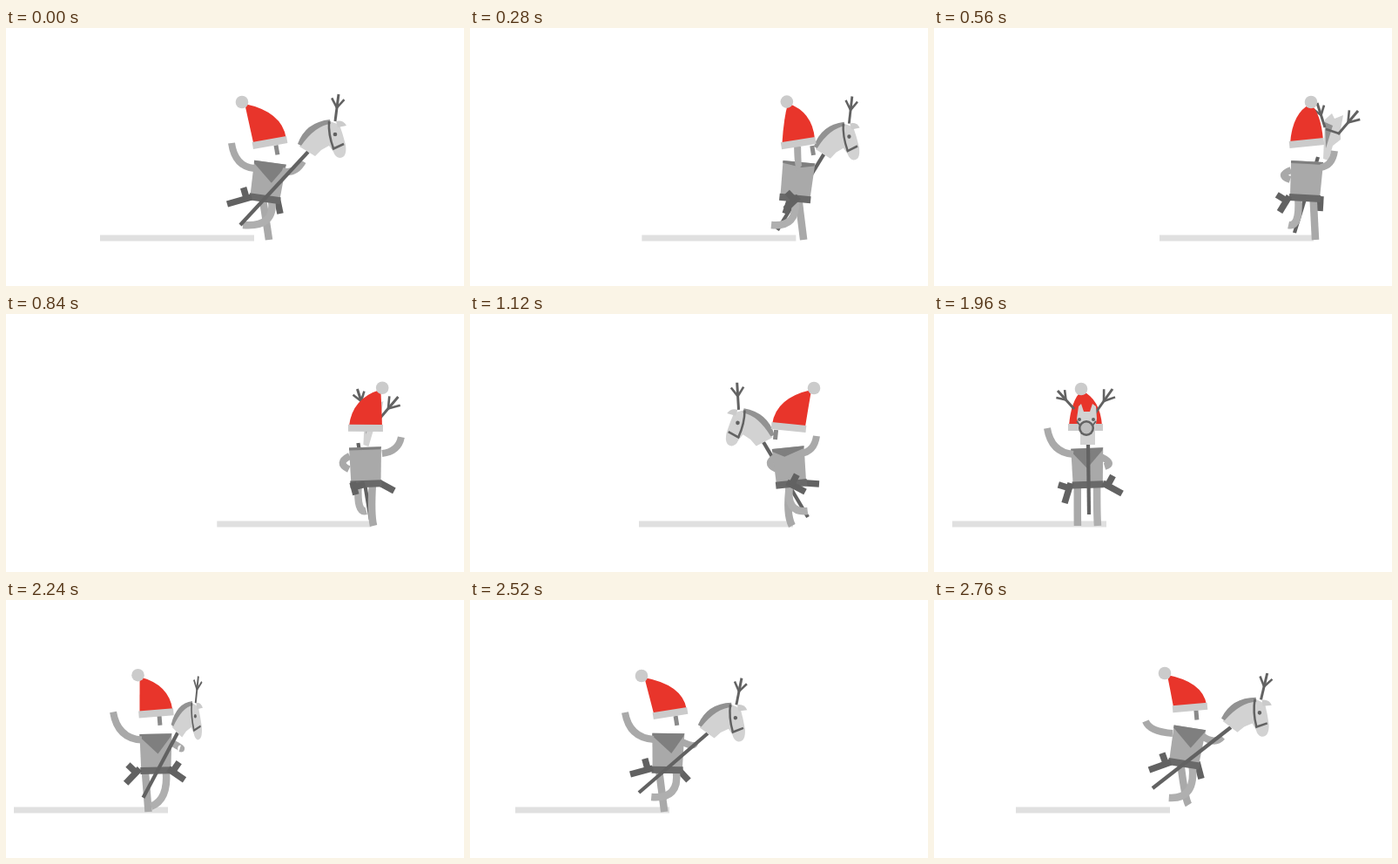
These frames come from a looping animation (526x296 px, 2800 ms). An HTML page with a canvas:

```html
<!DOCTYPE html>
<html lang="en">
<head>
<meta charset="utf-8">
<title>Hobby reindeer ride</title>
<style>
html, body { margin: 0; width: 100%; height: 100%; overflow: hidden; background: #fff; }
canvas { display: block; width: 526px; height: 296px; }
</style>
</head>
<body>
<canvas id="stage" width="526" height="296"></canvas>
<script>
const LOOP = 2800, HOP = 280, TICK = 40;
const KEYS = [0, 560, 1120, 1480, 1960, 2520, 2760];
const RED = '#e8352b', PALE = '#cbcbcb', LIGHT = '#d2d2d2', SKIN = '#a9a9a9',
      SCARF = '#7f7f7f', MANE = '#929292', DARK = '#626262';
const c = document.getElementById('stage').getContext('2d');
const clamp = (v, lo, hi) => Math.min(hi, Math.max(lo, v));

// Smooth periodic curve through (keys, vals).
function spline(keys, vals, period) {
  const n = keys.length;
  const k = i => keys[(i + n) % n] + Math.floor(i / n) * period;
  const v = i => vals[(i + n) % n];
  const slope = i => (v(i + 1) - v(i - 1)) / (k(i + 1) - k(i - 1));
  return t => {
    t = ((t % period) + period) % period;
    let i = n - 1;
    while (i > 0 && keys[i] > t) i--;
    const d = k(i + 1) - k(i), s = (t - k(i)) / d, r = 1 - s;
    return v(i) * (1 + 2 * s) * r * r + v(i + 1) * s * s * (3 - 2 * s)
      + d * s * r * (slope(i) * r - slope(i + 1) * s);
  };
}

const ground = spline([0, 560, 1120, 1480, 1680, 1960, 2120, 2240, 2520, 2760],
                      [108, 259, 194, 122, 58, 21, 2, 9, 52, 94], LOOP);
const plain = (...v) => spline(KEYS, v, LOOP);
// A track that rides on a base motion and still passes through its keys.
function ride(base, v) {
  const rest = spline(KEYS, v.map((y, i) => y - base(KEYS[i])), LOOP);
  return t => base(t) + rest(t);
}
const across = (...v) => ride(ground, v);
const bob = (amp, lag, ...v) =>
  ride(t => amp * Math.sin(2 * Math.PI * (t / HOP - lag)), v);

const turn = plain(0, -2, 11, -5, 16, 6, -3);
const body = {
  x: across(300, 427, 367, 275, 176, 227, 290),
  y: bob(9, 0, 176, 175, 175, 184, 176, 175, 168),
  tilt: plain(8, 3, -6, -2, -2, 1, 9)
};
const hat = {
  x: across(303, 428, 366, 270, 174, 230, 294),
  y: bob(9, .03, 131.5, 132, 130, 143, 130, 130, 123.5),
  tilt: plain(-10, -6, 6, 0, 0, -9, -5),
  pomX: across(271, 433, 395, 296, 169, 197, 265),
  pomY: bob(11, .1, 85, 85, 85, 105, 86, 87, 84)
};
const wave = {
  x: across(259, 460, 398, 247, 130, 178, 243),
  y: bob(5, .1, 132, 141, 140, 146, 131, 129, 139),
  root: plain(-15, 17, 13, -14, -16, -16, -16)
};
const grip = {
  x: across(341, 409, 352, 243, 196, 258, 331),
  y: bob(3, 0, 153, 174, 178, 169, 175, 163, 157),
  root: plain(17, -17, -14, -10, 16, 17, 18)
};
const stick = {
  x: across(269, 414, 388, 278, 178, 194, 251),
  y: bob(4, 0, 226, 235, 233, 221, 230, 221, 216),
  topX: across(347, 441, 337, 230, 177, 273, 341),
  topY: bob(2, .1, 142, 148, 147, 149, 150, 153, 146),
  nod: plain(0, 0, -4, -1, 0, 4, 6)
};
const guns = [{
  x: across(254, 443, 401, 250, 150, 184, 247),
  y: bob(6, .1, 202, 210, 195, 208, 217, 200, 195),
  root: plain(-18, 17, 5, -13, -19, -17, -18),
  near: (co, si) => co > si
}, {
  x: across(315, 397, 385, 312, 216, 251, 307),
  y: bob(6, .1, 213, 211, 204, 217, 206, 207, 205),
  root: plain(11, -19, -3, 18, 18, 11, 12),
  near: co => co < .6
}];

const gait = (...v) => spline([0, 80, 160, 240], v, HOP);
const legs = [
  { side: 1, reach: gait(2, -7, -12, 4), foot: gait(243, 243, 239, 235), tone: SKIN },
  { side: -1, reach: gait(-28, -20, -24, -22), foot: gait(226, 242, 233, 227), tone: '#afafaf' }
];

function fill(color, path) {
  c.fillStyle = color;
  c.fill(path);
}
function shape(color, ...pts) {
  c.beginPath();
  pts.forEach(([x, y]) => c.lineTo(x, y));
  c.fillStyle = color;
  c.fill();
}
function dot(color, x, y, r) {
  c.beginPath();
  c.arc(x, y, r, 0, 7);
  c.fillStyle = color;
  c.fill();
}
function line(color, w, x0, y0, x1, y1) {
  bend(color, w, x0, y0, (x0 + x1) / 2, (y0 + y1) / 2, x1, y1);
}
function bend(color, w, x0, y0, cx, cy, x1, y1) {
  c.beginPath();
  c.moveTo(x0, y0);
  c.quadraticCurveTo(cx, cy, x1, y1);
  c.lineWidth = w;
  c.strokeStyle = color;
  c.stroke();
}
function at(x, y, deg, draw) {
  c.save();
  c.translate(x, y);
  c.rotate(deg * Math.PI / 180);
  draw();
  c.restore();
}

function antler(x0, y0, x1, y1) {
  const dx = x1 - x0, dy = y1 - y0;
  const x = x0 + dx * .5, y = y0 + dy * .5;
  line(DARK, 3, x0, y0, x1, y1);
  for (const s of [-1, 1])
    line(DARK, 2.6, x, y, x + dx * .33 - s * dy * .23, y + dy * .33 + s * dx * .23);
}

const neck = new Path2D('M-10-6Q2-30 25-35L36-31Q40-20 43-8Q45 7 36 7Q31 6 29 0L24-7L15-2L8 5Z');
const mane = new Path2D('M-12-9Q-3-34 25-37L26-32Q8-30-8-7Z');
const ear = new Path2D('M32-35Q40-37 44-30L34-28Z');

function sideHead() {
  antler(31, -35, 35, -66);
  fill(LIGHT, neck);
  fill(PALE, ear);
  fill(MANE, mane);
  bend(DARK, 2.5, 24, -35, 23, -20, 29, -4);
  line(DARK, 2.5, 28, -3, 41, -9);
  dot(DARK, 31, -20, 2.3);
}
function frontHead() {
  antler(-16, -41, -35, -62);
  antler(8, -36, 28, -64);
  shape(LIGHT, [-11, -44], [-8, -47], [-5, -38], [2, -38], [5, -47], [9, -44],
    [10, -30], [8, -18], [8, 0], [-9, 0], [-9, -18], [-13, -30]);
  dot(DARK, -10, -29, 2);
  dot(DARK, 6, -29, 2);
  line(DARK, 2, -13, -27, -9, -22);
  line(DARK, 2, 9, -27, 5, -22);
  dot(DARK, -2, -19, 9);
  dot('#bdbdbd', -2, -19, 6.5);
}
function backHead() {
  shape(LIGHT, [8, -43], [16, -50], [19, -44], [29, -48], [26, -32],
    [26, -20], [17, -13], [12, 4], [6, 2]);
  shape(MANE, [8, -40], [17, -36], [9, -10]);
  antler(8, -34, -1, -62);
  antler(23, -26, 46, -53);
  line(DARK, 2.5, 9, -32, 24, -27);
}

function drawHorse(t, co, si) {
  const x = stick.topX(t), y = stick.topY(t);
  line(DARK, 4.2, stick.x(t), stick.y(t), x, y);
  at(x, y, 0, () => {
    if (Math.abs(co) < .45) return si > 0 ? backHead() : frontHead();
    c.scale(Math.sign(co) * Math.min(1, Math.abs(co) + .12), 1);
    c.rotate(stick.nod(t) * Math.PI / 180);
    sideHead();
  });
}

function drawLegs(t, x, y, co, si) {
  for (const leg of legs) {
    const spread = leg.side * 11 * si;
    const hip = x + spread - leg.side * 5 * Math.abs(co);
    const lift = (243 - leg.foot(t)) * (leg.side > 0 ? 1 : clamp((1 + si) * 2.5, 0, 1));
    bend(leg.tone, 8.5, hip, y + 21, hip + 5 * co, 229, x + spread + leg.reach(t) * co, 243 - lift);
  }
}

function drawGun(gun, t, x, y, co, si) {
  const x0 = x + gun.root(t), y0 = y + 18, x1 = gun.x(t), y1 = gun.y(t);
  line(DARK, 7.5, x0, y0, x1, y1);
  if (!gun.near(co, si)) return;
  const len = Math.hypot(x1 - x0, y1 - y0) || 1;
  const dx = (x1 - x0) / len, dy = (y1 - y0) / len, s = dx < 0 ? -1 : 1;
  const gx = x0 + dx * 6, gy = y0 + dy * 6;
  line(DARK, 7.5, gx, gy, gx + s * dy * 13, gy - s * dx * 13);
}

function drawTorso(x, y, tilt, co, si) {
  at(x, y, tilt, () => {
    shape(SKIN, [-18, -22], [19, -22], [17, 22], [-17, 22]);
    const drop = 20 * clamp(1 - 1.5 * si, 0, 1);
    shape(SCARF, [-18, -22], [19, -22], [18, -19], [5 * co, -19 + drop], [-18, -19]);
    line('#696969', 8, -18, 20, 18, 20);
  });
}

function drawGrip(t, x, y) {
  const root = grip.root(t), x0 = x + root, y0 = y - 12;
  const x1 = grip.x(t), y1 = grip.y(t), dx = Math.abs(x1 - x0);
  bend(SKIN, 8, x0, y0,
    (x0 + x1) / 2 + Math.sign(root) * Math.max(3, 16 - dx * .6),
    (y0 + y1) / 2 + 10 * Math.min(1, dx / 20), x1, y1);
}

function drawHat(t, co, si) {
  const x = hat.x(t), y = hat.y(t), tilt = hat.tilt(t), a = tilt * Math.PI / 180;
  const px = hat.pomX(t), py = hat.pomY(t), lean = clamp((px - x) / 30, -1, 1);
  if (Math.abs(co) > .45)
    at(x + 7 * co * (1 + 3 * Math.max(0, si)), y + 3, tilt, () => {
      c.fillStyle = '#8a8a8a';
      c.fillRect(-2.5, 0, 5, 11);
    });
  const tipX = px + (x - px) * .1, tipY = py + 2;
  const side = s => {
    const m = s * lean > 0 ? Math.abs(lean) : 0;
    const ex = x + s * 19 * Math.cos(a), ey = y + s * 19 * Math.sin(a) - 2;
    return [ex, ey, ex + (tipX - ex) * (.1 + .4 * m), ey + (tipY - ey) * (.77 - .27 * m)];
  };
  const l = side(-1), r = side(1);
  c.beginPath();
  c.moveTo(l[0], l[1]);
  c.quadraticCurveTo(l[2], l[3], tipX, tipY);
  c.quadraticCurveTo(r[2], r[3], r[0], r[1]);
  c.fillStyle = RED;
  c.fill();
  at(x, y, tilt, () => {
    c.fillStyle = PALE;
    c.fillRect(-20, -4, 40, 8);
  });
  dot(PALE, px, py, 7.3);
}

function draw(t) {
  const a = (t * 360 / LOOP + turn(t)) * Math.PI / 180;
  const co = Math.cos(a), si = Math.sin(a), away = si > .2;
  const x = body.x(t), y = body.y(t);
  c.fillStyle = '#fff';
  c.fillRect(0, 0, 526, 296);
  c.fillStyle = '#e0e0e0';
  c.fillRect(ground(t), 237.5, 177, 7);

  if (away) drawHorse(t, co, si);
  for (const g of guns) if (!g.near(co, si)) drawGun(g, t, x, y, co, si);
  drawLegs(t, x, y, co, si);
  if (away) drawGrip(t, x, y);
  drawTorso(x, y, body.tilt(t), co, si);
  const sx = x + wave.root(t), hx = wave.x(t);
  bend(SKIN, 8, sx, y - 15, hx * .85 + sx * .15, y - 17, hx, wave.y(t));
  for (const g of guns) if (g.near(co, si)) drawGun(g, t, x, y, co, si);
  drawHat(t, co, si);
  if (!away) {
    drawGrip(t, x, y);
    drawHorse(t, co, si);
  }
}

let start;
function frame() {
  const now = performance.now();
  start ??= now;
  draw(Math.floor(((now - start) % LOOP) / TICK) * TICK);
  requestAnimationFrame(frame);
}
frame();
</script>
</body>
</html>
```
